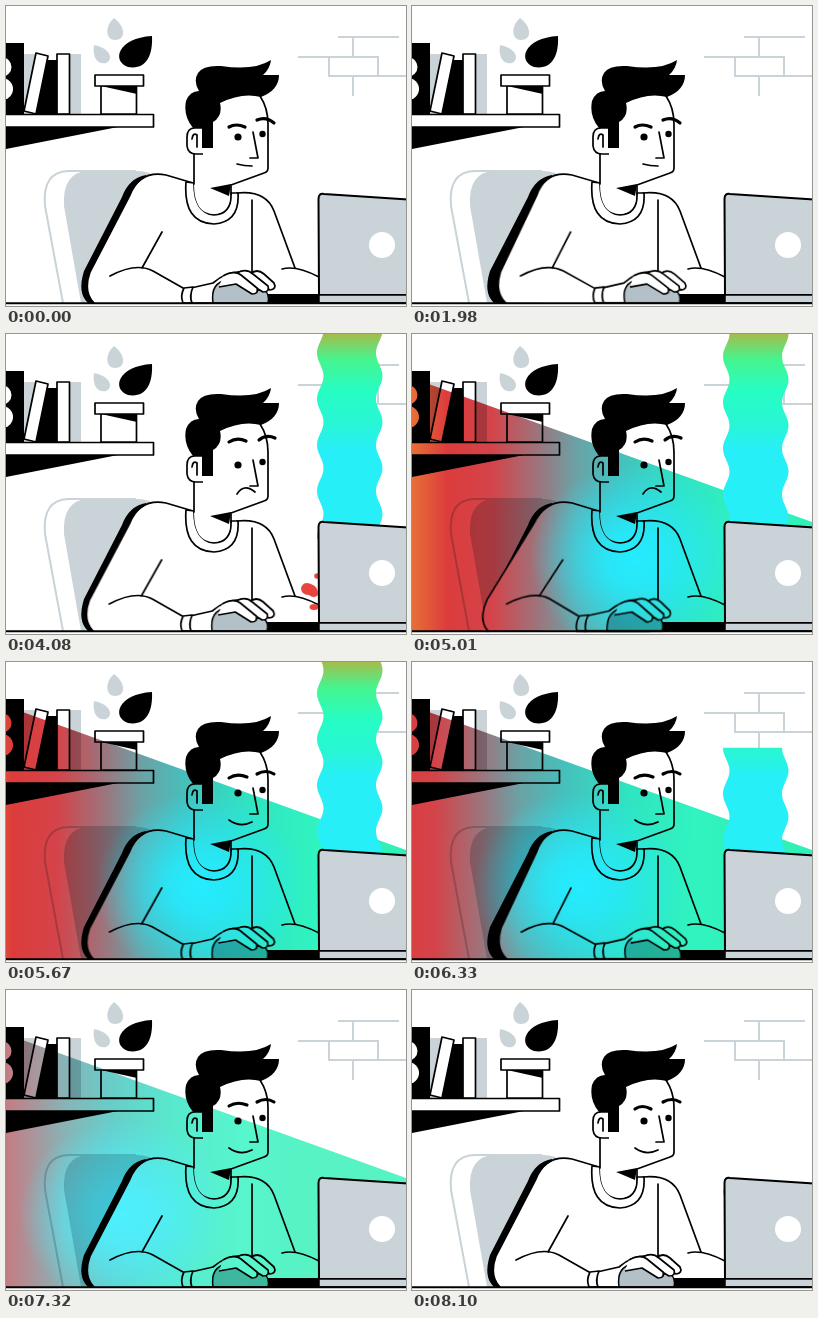
Recreate the animation shown at these times as an HTML page without scripts. Size 400x300 px, loop 8130 ms.

```html
<!DOCTYPE html>
<html lang="en">
<head>
<meta charset="utf-8">
<title>Desk</title>
<style>
html, body { margin: 0; width: 100%; height: 100%; overflow: hidden; background: #fff; }
svg { display: block; width: 100%; height: 100%; }

.ink { fill: none; stroke: #000; stroke-width: 1.7; stroke-linecap: round; stroke-linejoin: round; }
.paper { fill: #fff; stroke: #000; stroke-width: 1.7; stroke-linejoin: round; }
.grey { fill: #c9d3d8; }
.faint { fill: none; stroke: #c9d3d8; stroke-width: 2; }
.brow { stroke-width: 3.2; }

.arm, .ribbon, .wash, .beam, .drops, .mouth, .brow { animation: 8.13s linear infinite; }
.arm { transform-origin: 150px 170px; animation-name: sway; animation-timing-function: ease-in-out; }
.ribbon { animation-name: fall; }
.beam { mix-blend-mode: multiply; animation-name: fade; }
.wash { transform-origin: 330px 262px; animation-name: spread; }
.drops { transform-origin: 322px 258px; animation-name: spray; }
.mouth { animation-name: mouth; }
.left { animation-name: left; }
.right { animation-name: right; }

@keyframes sway {
  0%, 8% { transform: skewX(0deg); }
  22%, 27% { transform: skewX(2.6deg); }
  38% { transform: skewX(0deg); }
  50.2% { transform: skewX(-.4deg); }
  61.6% { transform: skewX(-5.4deg); }
  76%, 80% { transform: skewX(3deg); }
  90%, 100% { transform: skewX(0deg); }
}
@keyframes fall {
  0%, 30.1% { transform: translateY(-506px); }
  87.1%, 100% { transform: translateY(200px); }
}
@keyframes fade {
  0%, 80% { opacity: 1; }
  90% { opacity: .82; }
  97.5%, 100% { opacity: 0; }
}
@keyframes spread {
  0%, 50.4% { transform: scale(0); animation-timing-function: ease-out; }
  59% { transform: scale(1); }
  61.6% { transform: translateX(0); }
  77.9% { transform: translateX(-57px); }
  90%, 100% { transform: translateX(-105px); }
}
@keyframes spray {
  0%, 48.8% { transform: scale(0); opacity: 1; }
  50.2% { transform: scale(1); opacity: 1; }
  52.4% { transform: scale(3); opacity: 1; }
  53%, 100% { transform: scale(3); opacity: 0; }
}
@keyframes mouth {
  0%, 44% { d: path("M231 158Q238 160 246 160"); }
  47%, 65% { d: path("M231 160Q238 149 249 158"); }
  69%, 100% { d: path("M223 158Q234 166 246 160"); }
}
@keyframes left {
  0%, 44% { d: path("M223 121Q230 117 239 121"); }
  47%, 65% { d: path("M223 108Q231 103 240 107"); }
  69%, 90% { d: path("M223 116Q231 111 241 115"); }
  99%, 100% { d: path("M223 119Q230 114 239 119"); }
}
@keyframes right {
  0%, 44% { d: path("M251 114Q260 110 268 117"); }
  47%, 65% { d: path("M253 106Q260 100 269 104"); }
  69%, 100% { d: path("M251 112Q260 107 268 112"); }
}
</style>
</head>
<body>
<svg viewBox="0 0 400 300" preserveAspectRatio="none">
  <defs>
    <linearGradient id="stream" gradientUnits="userSpaceOnUse" x1="0" y1="0" x2="0" y2="115">
      <stop offset="0" stop-color="#a4bc4c"/>
      <stop offset=".22" stop-color="#46f48e"/>
      <stop offset=".5" stop-color="#26fdc4"/>
      <stop offset=".78" stop-color="#28f6d4"/>
      <stop offset="1" stop-color="#27eff8"/>
    </linearGradient>
    <linearGradient id="light" gradientUnits="userSpaceOnUse" x1="0" y1="170" x2="400" y2="170">
      <stop offset="0" stop-color="#e87038"/>
      <stop offset=".09" stop-color="#dc3c3c"/>
      <stop offset=".2" stop-color="#d4444a"/>
      <stop offset=".31" stop-color="#a0727a"/>
      <stop offset=".41" stop-color="#6ca2a6"/>
      <stop offset=".52" stop-color="#46c0bc"/>
      <stop offset=".68" stop-color="#30e4c2"/>
      <stop offset=".85" stop-color="#30f4c0"/>
      <stop offset="1" stop-color="#30f0b8"/>
    </linearGradient>
    <radialGradient id="glow">
      <stop offset="0" stop-color="#24ecff"/>
      <stop offset=".3" stop-color="#24ecff" stop-opacity=".85"/>
      <stop offset="1" stop-color="#24ecff" stop-opacity="0"/>
    </radialGradient>
    <clipPath id="wave">
      <path class="ribbon" d="M311 0c0 9 6.500 14 6.500 23s-6.500 14-6.500 23 6.500 14 6.500 23-6.500 14-6.500 23 6.500 14 6.500 23-6.500 14-6.500 23 6.500 14 6.500 23-6.500 14-6.500 23 6.500 14 6.500 23-6.500 14-6.500 23 6.500 14 6.500 23-6.500 14-6.500 23 6.500 14 6.500 23-6.500 14-6.500 23 6.500 14 6.500 23-6.500 14-6.500 23 6.500 14 6.500 23-6.500 14-6.500 23 6.500 14 6.500 23-6.500 14-6.500 23 6.500 14 6.500 23-6.500 14-6.500 23h59c0-9 6.500-14 6.500-23s-6.500-14-6.500-23 6.500-14 6.500-23-6.500-14-6.500-23 6.500-14 6.500-23-6.500-14-6.500-23 6.500-14 6.500-23-6.500-14-6.500-23 6.500-14 6.500-23-6.500-14-6.500-23 6.500-14 6.500-23-6.500-14-6.500-23 6.500-14 6.500-23-6.500-14-6.500-23 6.500-14 6.500-23-6.500-14-6.500-23 6.500-14 6.500-23-6.500-14-6.500-23 6.500-14 6.500-23-6.500-14-6.500-23 6.500-14 6.500-23-6.500-14-6.500-23z"/>
    </clipPath>
    <clipPath id="cone"><path d="M0 44L400 188V297H0z"/></clipPath>
  </defs>

  <rect width="400" height="300" fill="#fff"/>
  <path class="faint" d="M332 31H393M347 31V51M292 51H372V70H323V51M372 70H400M347 70V90"/>

  <!-- shelf -->
  <path d="M0 121H112L0 143z"/>
  <path class="grey" d="M18 48H40V108H18zM63 48H75V108H63z"/>
  <path d="M0 37H18V108H0zM38 54H52V108H30z"/>
  <circle cx="-4" cy="61" r="9.5" fill="#fff"/>
  <circle cx="-4" cy="83" r="11" fill="#fff"/>
  <path class="paper" d="M30 47L42 50 30 108 18 105zM51 48H63.500V108H51z"/>
  <path class="paper" d="M-2 108.500H147.500V121H-2z"/>

  <!-- plant -->
  <path class="grey" d="M108 12C98 21 100 34 109 34C120 34 120 21 108 12zM88 39C86 52 92 59 100 57C108 53 104 42 88 39z"/>
  <path d="M146 30C147 51 139 64 122 61C105 55 112 32 146 30z"/>
  <path class="paper" d="M95 80H130.500V108H95zM89 69H137.500V80H89z"/>
  <path d="M95 80H131V88z"/>

  <!-- chair -->
  <path class="faint" d="M57 297L39 200Q36 166 62 165H130"/>
  <path class="grey" d="M75 297L58 200Q56 166 82 165H132Q142 165 150 171L130 297z"/>
  <path d="M140 169Q123 172 116 191L78 265Q71 287 82 297H130z"/>

  <!-- torso -->
  <path fill="#fff" d="M152 169L188 177H232Q260 184 268 205L290 262 313 271V297H130V200z"/>
  <path class="ink" d="M231 187Q260 184 268 205L289 262M276 263Q290 259 313 271M246 194V266"/>
  <path d="M250 288H315V297H250z"/>

  <g class="arm">
    <path fill="#fff" d="M157 169Q134 167 124 189L84 266Q77 286 88 297H184L200 230z"/>
    <path class="ink" d="M187 177L160 169Q134 164 124 189L84 266Q77 286 88 297M156 226L136 262M104 270Q130 256 147 265L177 282"/>
    <path class="paper" d="M184 297L185 282 207 277Q222 264 238 266L250 297z"/>
    <path class="paper" d="M178 282Q174 290 177 297H186Q183 290 187 281z"/>
    <path d="M207 297Q204 276 222 274Q242 275 249 284H258Q264 288 262 297z" fill="#b3c0c7" stroke="#000" stroke-width="1.500"/>
    <path class="paper" d="M244 268Q251 262 258 268L268 277Q271 283 264 284L252 279z"/>
    <path class="paper" d="M231 267Q240 262 247 268L262 280Q264 286 257 286L242 277z"/>
    <path class="paper" d="M217 270Q228 264 235 269L251 282Q253 288 246 288L230 278 213 281"/>
  </g>

  <!-- neck and head -->
  <path class="paper" d="M180 176Q177 217 208 218Q234 216 232 187L225 187Q226 208 208 209Q188 207 188 177z"/>
  <path fill="#fff" d="M188 140V178Q188 208 208 208Q225 207 224 187V170z"/>
  <path fill="#fff" d="M196 90H256Q262 104 262 118V166L225 179 205 177 190 148z"/>
  <path d="M204 182L225 178 223 190z"/>
  <path class="ink" d="M188 145V178M254 90Q262 102 262 118V162Q262 166 258 167L225 179V188"/>
  <path class="paper" d="M197 122H189Q181 122 181 131V140Q182 148 190 148H197"/>
  <path class="ink" d="M186 133Q187 126 191 129V141"/>
  <path d="M192 67Q197 59 215 60Q248 65 265 54Q264 63 257 69L273 69Q273 84 255 91Q236 86 214 97Q217 110 207 116V142H196V122H187Q177 110 180 95Q184 85 193 85Q187 75 192 67z"/>
  <circle cx="232" cy="131" r="3.600"/>
  <circle cx="256.500" cy="128" r="3.200"/>
  <path class="ink" d="M247 126L252 152 244 152"/>
  <path class="ink mouth" d="M231 158Q238 160 246 160"/>
  <path class="ink brow left" d="M223 121Q230 117 239 121"/>
  <path class="ink brow right" d="M251 114Q260 110 268 117"/>

  <!-- coloured light -->
  <g class="beam" clip-path="url(#cone)">
    <g class="wash">
      <path fill="url(#light)" d="M-10 -60H560V400H-10Q-60 350-10 310Q-70 260-10 215Q-50 180-10 140Q-70 90-10 50Q-50 0-10-60z"/>
      <ellipse cx="223" cy="224" rx="105" ry="95" fill="url(#glow)"/>
    </g>
  </g>
  <g class="drops" fill="#e8433c">
    <path d="M295 254Q297 247 305 250Q313 253 312 261Q308 265 303 261Q295 261 295 254z"/>
    <circle cx="311" cy="242" r="2.800"/>
    <ellipse cx="308" cy="273" rx="4.500" ry="3"/>
  </g>
  <rect width="400" height="205" fill="url(#stream)" clip-path="url(#wave)"/>

  <!-- laptop and desk -->
  <path class="grey" stroke="#000" stroke-width="2" d="M402 193.500L318 188Q312.500 187 312.500 193L313 289H402z"/>
  <path class="grey" stroke="#000" stroke-width="1.500" d="M313 289H402V297H313z"/>
  <circle cx="376" cy="239" r="13" fill="#fff"/>
  <path d="M0 297.200H400" stroke="#000" stroke-width="2"/>
</svg>
</body>
</html>
```
